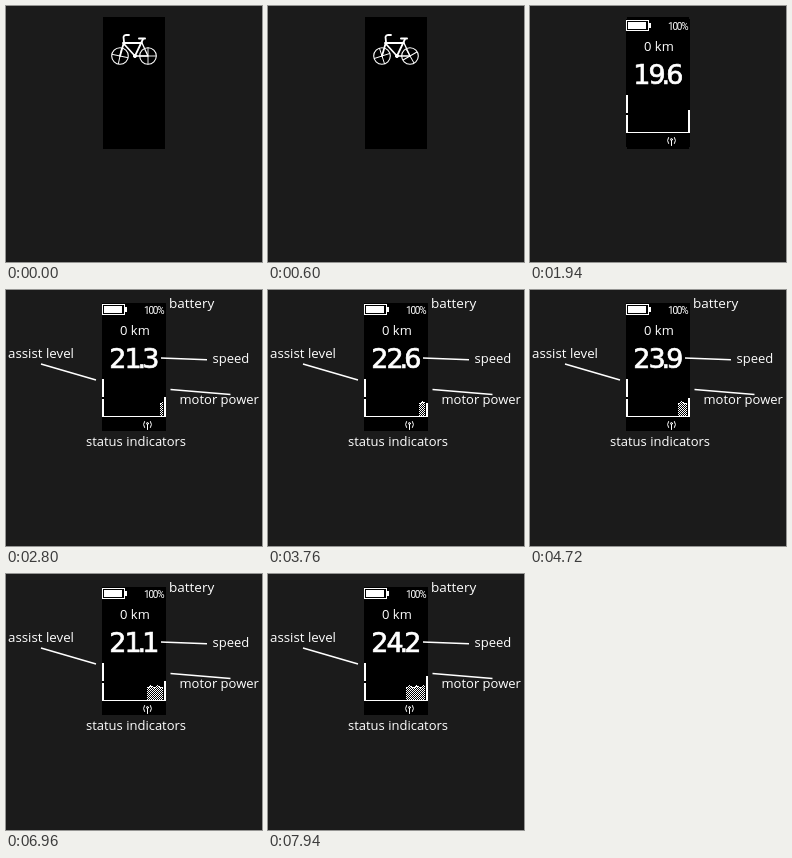
An HTML page for the animation above (8 s loop, 256x256 px).

```html
<!DOCTYPE html>
<html lang="en">
<head>
<meta charset="utf-8">
<title>E-bike display</title>
<style>
  html, body { margin: 0; width: 100%; height: 100%; overflow: hidden; background: #1b1b1b; }
  svg { display: block; width: 100%; height: 100%; }
  text { fill: #fff; font-family: "Open Sans", "Noto Sans", sans-serif; font-size: 13px; white-space: pre; }
  #labels text { font-weight: 500; }
  #labels path { stroke: #fff; stroke-width: 1.4; }
  #speed { font-family: "DejaVu Sans", sans-serif; font-size: 27px; letter-spacing: -2px; stroke: #fff; stroke-width: .7; }
  #charge { font-family: Roboto, sans-serif; font-size: 10px; letter-spacing: -1.2px; }
  .line { fill: none; stroke: #fff; stroke-linecap: round; stroke-linejoin: round; }
  .crisp { shape-rendering: crispEdges; fill: #fff; }
</style>
</head>
<body>
<svg viewBox="0 0 256 256">
  <rect width="256" height="256" fill="#1b1b1b"/>
  <rect id="panel" x="97" y="11" width="62" height="132"/>

  <g id="bike" class="line">
    <g id="wheels" stroke-width="1.1"></g>
    <g stroke-width="1.8">
      <path d="M114 50L118 36L117.5 31Q118 29 120 29H123"/>
      <path d="M117 37H136M118 38L129 50L137 33"/>
      <path d="M133 32.5H139" stroke-width="2"/>
      <path d="M136 37L142 50H129" stroke-width="1.3"/>
    </g>
    <circle cx="129" cy="50" r="1.6" fill="#fff"/>
  </g>

  <g id="screen">
    <rect x="96" y="13" width="64" height="128"/>
    <g class="crisp">
      <path fill-rule="evenodd" d="M96 14h23v3h2v5h-2v3h-23zM97 15v9h21v-9z"/>
      <path d="M98 16h18v7h-18zM96 89h2v18h-2zM96 109h2v18h-2zM98 126h60v1h-60z"/>
      <path id="graph"/>
      <rect id="bar" x="158" width="2"/>
    </g>
    <text id="charge" x="138" y="24">100%</text>
    <text x="114" y="45">0 km</text>
    <text id="speed" x="103.2" y="78" dx="0 0 -2 -2"></text>
    <g class="line" stroke-width="1">
      <path d="M141.5 134V139.5M138.5 131.5Q136.5 134.5 138.5 137.5M144.5 131.5Q146.5 134.5 144.5 137.5"/>
      <circle cx="141.5" cy="133.5" r="1"/>
    </g>
  </g>

  <g id="labels">
    <text x="163" y="18" style="font-size:13.5px">battery</text>
    <text x="2" y="68" style="font-size:13.3px">assist level</text>
    <text x="206.5" y="73">speed</text>
    <text x="173.5" y="114">motor power</text>
    <text x="80" y="156">status indicators</text>
    <path d="M35 74L90 90M155 68L201 69.7M164.5 99.5L224.5 104.5"/>
  </g>
</svg>
<script>
  const LOOP = 8000, SCREEN_AT = 1800, LABELS_AT = 1960;
  const GRAPH_AT = 2160, SAMPLE = 320, RIGHT = 157, BASE = 126;

  const speeds = [19.6, 21.3, 22.6, 23.9, 22.8, 21.1, 24.2]; // one reading per second
  const power = [[1800, 104], [2600, 105], [3440, 114], [5840, 103], [6340, 110], [LOOP, 102]];

  const $ = id => document.getElementById(id);
  const show = (id, on) => $(id).style.display = on ? '' : 'none';

  function lerpAt(points, t) {
    const i = points.findIndex(([time]) => time > t);
    const [t0, a] = points[i - 1], [t1, b] = points[i];
    return a + (b - a) * (t - t0) / (t1 - t0);
  }

  $('wheels').innerHTML = [114, 142].map(x =>
    `<g transform="translate(${x} 50)"><circle r="8.3"/>` +
    '<path class="spokes" stroke-width=".9" d="M-8 0H8M0-8V8"/></g>').join('');
  const spokes = document.querySelectorAll('.spokes');

  // Dithered columns; each new sample pushes the rest one pixel left.
  function graphPath(t) {
    const count = Math.floor((t - GRAPH_AT) / SAMPLE) + 1;
    let d = '';
    for (let i = 0; i < count; i++) {
      const x = RIGHT - count + i;
      const top = Math.round(112.3 - Math.sin(i * 0.9 - 1.2));
      for (let y = top; y < BASE; y++) {
        if (y === top || (x + y) % 2 === 0) d += `M${x} ${y}h1v1h-1z`;
      }
    }
    return d;
  }

  function draw(t) {
    const riding = t < SCREEN_AT;
    show('bike', riding);
    show('screen', !riding);
    show('panel', t < LABELS_AT);
    show('labels', t >= LABELS_AT);
    if (riding) {
      const turn = -15 * Math.floor((t + 40) / 80);
      spokes.forEach((s, i) => s.setAttribute('transform', `rotate(${turn + (i ? 0 : 12)})`));
      return;
    }
    const top = Math.round(lerpAt(power, t));
    $('speed').textContent = speeds[Math.floor(t / 1000) - 1].toFixed(1);
    $('bar').setAttribute('y', top);
    $('bar').setAttribute('height', BASE + 1 - top);
    $('graph').setAttribute('d', graphPath(t));
  }

  const start = performance.now();
  function tick() {
    draw((performance.now() - start) % LOOP);
    requestAnimationFrame(tick);
  }
  tick();
</script>
</body>
</html>
```
